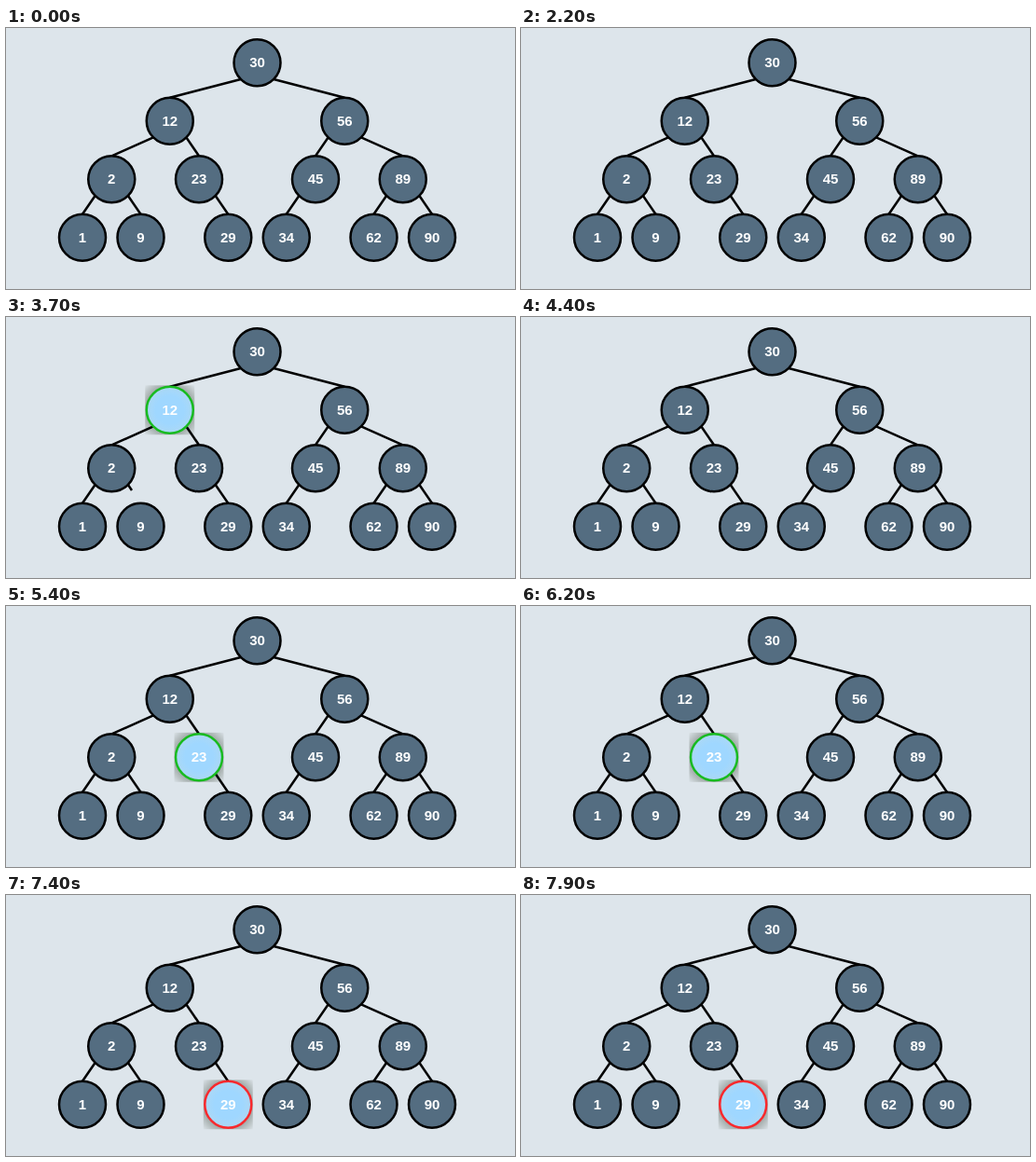
An HTML page that plays this animation: 546x280 px, repeating every 8 s.

```html
<!DOCTYPE html>
<html lang="en">
<head>
<meta charset="utf-8">
<title>Binary search tree traversal</title>
<style>
  html, body { margin: 0; width: 100%; height: 100%; overflow: hidden; background: #dde5eb; }
  svg { display: block; }
  line { stroke: #000; stroke-width: 2.5; }
  circle { fill: #546d81; stroke: #000; stroke-width: 2.5; }
  text { font: bold 15px "Liberation Sans", Arial, sans-serif; fill: #fff; text-anchor: middle; }
</style>
</head>
<body>
<svg width="546" height="280" viewBox="0 0 546 280">
  <defs>
    <radialGradient id="shade" gradientUnits="objectBoundingBox" r="0.7">
      <stop offset="0.68" stop-color="#4b5548" stop-opacity="0.42"/>
      <stop offset="1" stop-color="#4b5548" stop-opacity="0.04"/>
    </radialGradient>
    <radialGradient id="lit">
      <stop offset="0.6" stop-color="#9fd7ff"/>
      <stop offset="1" stop-color="#acd8f5"/>
    </radialGradient>
  </defs>
  <rect id="halo" width="53" height="53" fill="url(#shade)"/>
  <g id="edges"></g>
  <g id="nodes"></g>
</svg>
<script>
const LOOP = 8000, R = 25, DIAG = R * Math.SQRT1_2;
const GREEN = '#18bb20', RED = '#f8292d';
const tree = [30,
  [12, [2, [1], [9]], [23, null, [29]]],
  [56, [45, [34], null], [89, [62], [90]]]];
const visits = [
  { value: 12, from: 3400, to: 4400, ring: GREEN },
  { value: 23, from: 5400, to: 6400, ring: GREEN },
  { value: 29, from: 7400, to: 8400, ring: RED }
];

const halo = document.getElementById('halo');
const edges = document.getElementById('edges');
const nodes = document.getElementById('nodes');
const byValue = {};
let column = 0;

function add(parent, tag, attrs, label = '') {
  const el = document.createElementNS('http://www.w3.org/2000/svg', tag);
  set(el, attrs);
  el.textContent = label;
  return parent.appendChild(el);
}

function set(el, attrs) {
  for (const key in attrs) el.setAttribute(key, attrs[key]);
}

// In-order position gives the column, depth gives the row.
function build(branch, depth) {
  if (!branch) return null;
  const [value, left, right] = branch;
  const a = build(left, depth + 1);
  const node = { x: 82 + 31.25 * column++, y: 37.3 + 62.5 * depth };
  const b = build(right, depth + 1);
  if (a) connect(node, a, -1);
  if (b) connect(node, b, 1);
  node.circle = add(nodes, 'circle', { cx: node.x, cy: node.y, r: R });
  add(nodes, 'text', { x: node.x, y: node.y + 5 }, value);
  return byValue[value] = node;
}

function connect(parent, child, side) {
  child.start = { x: parent.x + side * DIAG, y: parent.y + DIAG };
  child.edge = add(edges, 'line', { x1: child.start.x, y1: child.start.y });
  growEdge(child, 1);
}

function growEdge({ x, y, start, edge }, k) {
  set(edge, {
    x2: start.x + (x - start.x) * k,
    y2: start.y + (y - R - start.y) * k
  });
}

function draw(t) {
  halo.style.display = 'none';
  for (const { value, from, to, ring } of visits) {
    const { circle, x, y } = byValue[value];
    const on = t >= from && t < to;
    circle.style.fill = on ? 'url(#lit)' : '';
    circle.style.stroke = on ? ring : '';
    if (on) {
      set(halo, { x: x - 26.5, y: y - 26.5 });
      halo.style.display = '';
    }
  }
  // The edge to 9 is redrawn in 100 ms steps while 12 is visited.
  const step = Math.floor((t - 3400) / 100) / 10;
  growEdge(byValue[9], step >= 0 && step < 1 ? step : 1);
}

build(tree, 0);
const begin = performance.now();
function tick() {
  draw((performance.now() - begin) % LOOP);
  requestAnimationFrame(tick);
}
tick();
</script>
</body>
</html>
```
